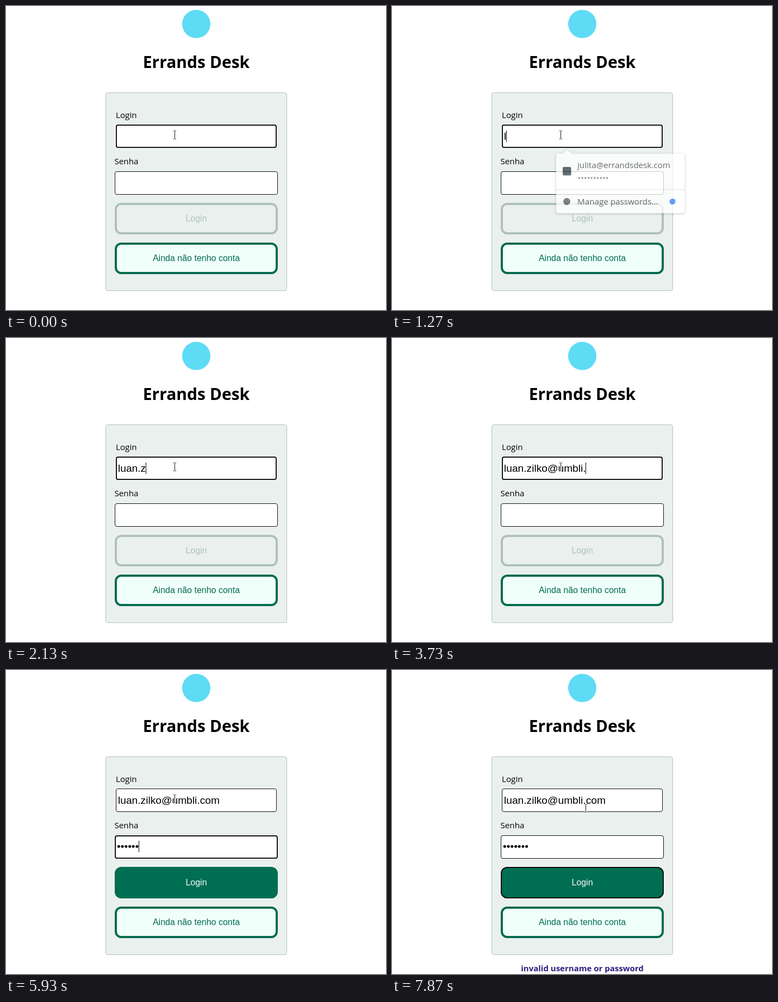
An HTML page that plays this animation: 699x559 px, repeating every 8 s.

```html
<!DOCTYPE html>
<html lang="pt">
<head>
<meta charset="utf-8">
<title>Errands Desk</title>
<style>
  html, body { margin: 0; width: 100%; height: 100%; overflow: hidden; background: #fff; }
  svg { display: block; }
  text { white-space: pre; }
  .ui { font-family: "Open Sans", sans-serif; font-size: 15.2px; }
  .form { font-family: "Liberation Sans", Arial, sans-serif; font-size: 16px; }
  .entry { font-size: 19.2px; }
  .mid { text-anchor: middle; }
  .bold { font-weight: 700; }
  #popup { filter: drop-shadow(0 1px 2px rgba(0, 0, 0, .3)); }
</style>
</head>
<body>
<svg width="699" height="559" viewBox="0 0 699 559">
  <rect width="699" height="559" fill="#fff"/>
  <circle cx="350" cy="33" r="26" fill="#5edbf5"/>
  <text class="ui bold mid" x="350" y="114" style="font-size:30px">Errands Desk</text>

  <rect x="183.5" y="159.5" width="333" height="364" rx="4" fill="#eaf0ee" stroke="#b1c2bd"/>
  <text class="ui" x="202" y="206">Login</text>
  <text class="ui" x="199.5" y="291">Senha</text>

  <g id="userBox"></g>
  <g id="passBox"></g>
  <text id="user" class="form entry" x="206" y="246"></text>
  <text id="pass" class="form entry" x="204" y="331"></text>
  <rect id="caret" width="1" height="21"/>

  <rect id="halo" x="199" y="361" width="302" height="60" rx="13" fill="#fff"/>
  <rect id="login" x="202" y="364" width="296" height="54" rx="10" stroke-width="4"/>
  <rect id="ring" x="201" y="363" width="298" height="56" rx="11" fill="none" stroke="#101010" stroke-width="2"/>
  <text id="loginText" class="form mid" x="350" y="396">Login</text>

  <rect x="202" y="437" width="296" height="54" rx="10" fill="#f0fffa" stroke="#006b50" stroke-width="4"/>
  <text class="form mid" x="350" y="469" fill="#006b50">Ainda não tenho conta</text>

  <text id="error" class="ui bold mid" x="350" y="554" style="font-size:15px" fill="#2f1c7e">invalid username or password</text>

  <g id="popup">
    <path d="M305 271.500H313.500L322.500 265L331.500 271.500H535.500a3 3 0 0 1 3 3V378a3 3 0 0 1-3 3H305a3 3 0 0 1-3-3V274.500a3 3 0 0 1 3-3Z" fill="#fff"/>
    <path d="M302 337.500H538.500" stroke="#dcdcdc"/>
    <rect x="314" y="296" width="15.500" height="15.500" rx="2" fill="#35464b"/>
    <text class="ui" x="341" y="298" fill="#444">julita@errandsdesk.com</text>
    <text class="ui" x="341.500" y="322" fill="#757a7e">••••••••••</text>
    <circle cx="321.500" cy="359.500" r="6.500" fill="#5f6368"/>
    <text class="ui" x="341" y="365" fill="#444">Manage passwords…</text>
    <circle cx="516" cy="359.500" r="5.500" fill="#4285f4"/>
  </g>

  <g id="mouse" fill="none">
    <path id="beam" d="M-2.500-7.500h1.500l1 1l1-1h1.500M0-6.500v13M-2.500 7.500h1.500l1-1l1 1h1.500" stroke="#fff" stroke-width="3"/>
    <use href="#beam" style="display:none"/>
    <path d="M-2.500-7.500h1.500l1 1l1-1h1.500M0-6.500v13M-2.500 7.500h1.500l1-1l1 1h1.500" stroke="#111"/>
  </g>
</svg>
<script>
const LOOP = 8000, FRAME = 100 / 3;
const $ = id => document.getElementById(id);
const EMAIL = "luan.zilko@umbli.com";
const emailKeys = [1200, 1300, 1400, 1500, 1770, 2130, 2170, 2330, 2430, 2600,
  2900, 3170, 3270, 3370, 3430, 3530, 3730, 3830, 3970, 4070];
const passKeys = [5000, 5170, 5330, 5600, 5730, 5930, 6130];
const mousePath = [[0, 310.5, 237], [7630, 320.5, 246], [7770, 340.5, 261], [7870, 356.5, 254]];
const toPass = 4200, submit = 6530;

const typed = (keys, t) => keys.filter(k => t >= k).length;
const within = (t, a, b) => t >= a && t < b;
const show = (el, on) => el.setAttribute("display", on ? "inline" : "none");
const set = (el, attrs) => { for (const k in attrs) el.setAttribute(k, attrs[k]); };

function box(x, y, w, h, focus) {
  const rect = (d, r, style) =>
    `<rect x="${x + d}" y="${y + d}" width="${w - 2 * d}" height="${h - 2 * d}" rx="${r}" ${style}/>`;
  return focus
    ? rect(-1, 5, 'fill="#fff"') + rect(1, 3, 'fill="#fff" stroke="#101010" stroke-width="2"')
    : rect(.5, 3.5, 'fill="#fff" stroke="#101010"');
}

function popupAlpha(t) {
  if (!within(t, 370, 1500)) return 0;
  return t < 1200 ? 1 : 1 - Math.floor((t - 1200) / FRAME) / 9;
}

function draw(t) {
  const inPass = t >= toPass, sent = t >= submit;
  const user = $("user"), pass = $("pass");
  $("userBox").innerHTML = box(202, 218, 296, 43, !inPass);
  $("passBox").innerHTML = box(200, 304, 300, 43, inPass && !sent);
  user.textContent = EMAIL.slice(0, typed(emailKeys, t));
  pass.textContent = "•".repeat(typed(passKeys, t));

  const field = inPass ? pass : user;
  const width = field.textContent ? field.getComputedTextLength() : 0;
  set($("caret"), { x: Math.floor((inPass ? 204 : 206) + width), y: inPass ? 314 : 229 });
  show($("caret"), within(t, 200, 800) || within(t, 1200, 4800) || within(t, 5000, submit));

  const valid = typed(passKeys, t) >= 6;
  set($("login"), { fill: valid ? "#006e52" : "#eaf0ee", stroke: valid ? "#006e52" : "#adc1bb" });
  set($("loginText"), { fill: valid ? "#f0fffa" : "#adc1bb" });
  show($("halo"), sent);
  show($("ring"), sent);
  show($("error"), t >= 6970);

  const alpha = popupAlpha(t);
  show($("popup"), alpha > 0);
  set($("popup"), { opacity: alpha });

  const [, x, y] = mousePath.filter(p => t >= p[0]).pop();
  set($("mouse"), { transform: `translate(${x} ${y})` });
}

const start = performance.now();
function tick() {
  draw((performance.now() - start) % LOOP);
  requestAnimationFrame(tick);
}
tick();
</script>
</body>
</html>
```
